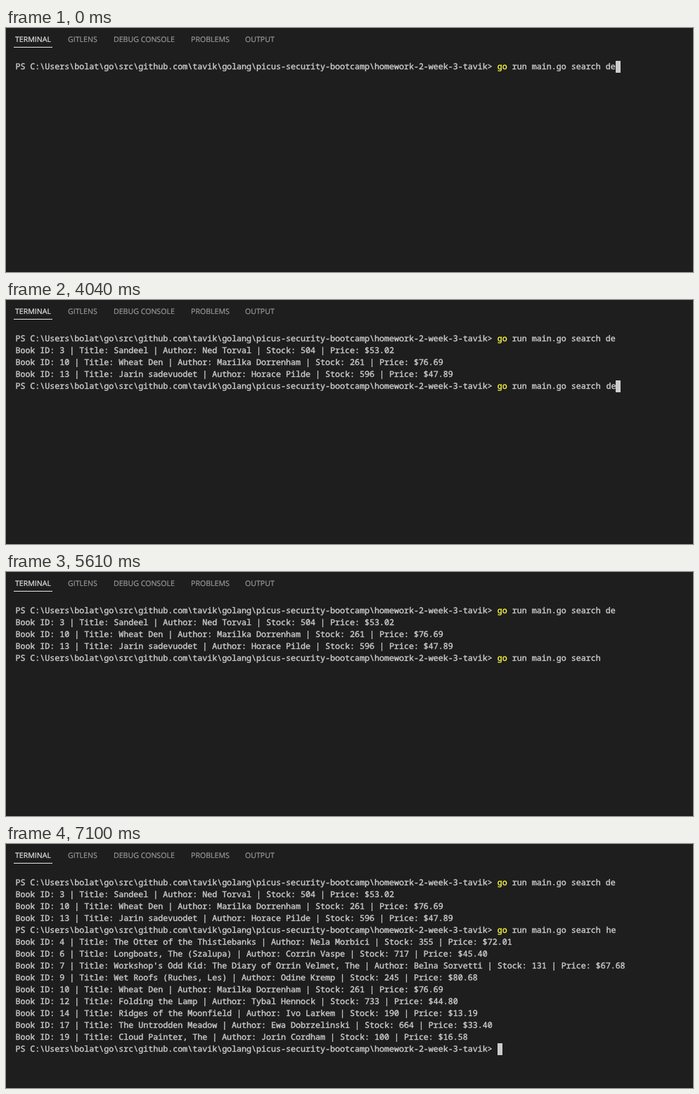
An HTML page for the animation above (7.83 s loop, 977 px wide and 349 px high).

```html
<!DOCTYPE html>
<html lang="en">
<head>
<meta charset="utf-8">
<title>Terminal search</title>
<style>
html, body { margin: 0; width: 100%; height: 100%; overflow: hidden; background: #1e1e1e; }

.tab {
  position: absolute; top: 9px;
  font: 10.6px/16px "Open Sans", "Noto Sans", sans-serif;
  color: #9a9a9a; white-space: nowrap; text-rendering: geometricPrecision;
  -webkit-text-stroke: .2px;
}
.tab.on { color: #e7e7e7; }
.line { position: absolute; left: 11px; top: 27px; width: 55px; height: 1px; background: #e7e7e7; }
.edge { position: absolute; left: 0; top: 348px; width: 977px; height: 1px; background: #191919; }

/* cell: 7 x 17 px */
.term {
  position: absolute; left: 13.4px; top: 47px; margin: 0;
  font: calc(7px / .6)/17px "Noto Sans Mono", "DejaVu Sans Mono", monospace;
  color: #ccc; white-space: pre; font-variant-ligatures: none; text-rendering: geometricPrecision;
  -webkit-text-stroke: .4px;
}
.term b { font-weight: 400; color: #f5f543; }
.key { position: absolute; left: 840px; top: 68px; }
.key.two { left: 847px; }
.cursor { position: absolute; left: 13px; top: 47px; width: 7px; height: 17px; background: #ccc; }

.first, .cmd, .d, .e, .h, .e2, .second, .cursor { animation: 7830ms step-end infinite; }
.first { animation-name: first; }
.cmd { animation-name: cmd; }
.d { animation-name: d; }
.e { animation-name: e; }
.h { animation-name: h; }
.e2 { animation-name: e2; }
.second { animation-name: second; }
.cursor { animation-name: cursor; }

@keyframes first { 0% { opacity: 0 } 14.559%, 100% { opacity: 1 } }
@keyframes cmd { 0% { opacity: 0 } 51.596%, 100% { opacity: 1 } }
@keyframes d { 0% { opacity: 0 } 51.596% { opacity: 1 } 63.218%, 100% { opacity: 0 } }
@keyframes e { 0% { opacity: 0 } 51.596% { opacity: 1 } 60.025%, 100% { opacity: 0 } }
@keyframes h { 0% { opacity: 0 } 72.669%, 100% { opacity: 1 } }
@keyframes e2 { 0% { opacity: 0 } 74.584%, 100% { opacity: 1 } }
@keyframes second { 0% { opacity: 0 } 90.676%, 100% { opacity: 1 } }
@keyframes cursor {
  0% { transform: translate(854px, 0); opacity: 1 }
  .893% { transform: translate(0, 17px); opacity: 1 }
  14.559% { transform: translate(686px, 68px); opacity: 1 }
  51.596% { transform: translate(854px, 68px); opacity: 1 }
  60.025% { transform: translate(847px, 68px); opacity: 1 }
  63.218% { transform: translate(840px, 68px); opacity: 1 }
  71.647% { transform: translate(840px, 68px); opacity: 0 }
  72.669% { transform: translate(847px, 68px); opacity: 1 }
  74.584% { transform: translate(854px, 68px); opacity: 1 }
  76.756% { transform: translate(0, 85px); opacity: 1 }
  90.676%, 100% { transform: translate(686px, 238px); opacity: 1 }
}
</style>
</head>
<body>
<div class="tab on" style="left:13px">TERMINAL</div>
<div class="tab" style="left:88px">GITLENS</div>
<div class="tab" style="left:153px">DEBUG CONSOLE</div>
<div class="tab" style="left:263px">PROBLEMS</div>
<div class="tab" style="left:340px">OUTPUT</div>
<div class="line"></div>
<div class="term">PS C:\Users\bolat\go\src\github.com\tavik\golang\picus-security-bootcamp\homework-2-week-3-tavik> <b>go</b> run main.go search de
<span class="first">Book ID: 3 | Title: Sandeel | Author: Ned Torval | Stock: 504 | Price: $53.02
Book ID: 10 | Title: Wheat Den | Author: Marilka Dorrenham | Stock: 261 | Price: $76.69
Book ID: 13 | Title: Jarin sadevuodet | Author: Horace Pilde | Stock: 596 | Price: $47.89
PS C:\Users\bolat\go\src\github.com\tavik\golang\picus-security-bootcamp\homework-2-week-3-tavik> </span><span class="cmd"><b>go</b> run main.go search </span>
<span class="second">Book ID: 4 | Title: The Otter of the Thistlebanks | Author: Nela Morbici | Stock: 355 | Price: $72.01
Book ID: 6 | Title: Longboats, The (Szalupa) | Author: Corrin Vaspe | Stock: 717 | Price: $45.40
Book ID: 7 | Title: Workshop's Odd Kid: The Diary of Orrin Velmet, The | Author: Belna Sorvetti | Stock: 131 | Price: $67.68
Book ID: 9 | Title: Wet Roofs (Ruches, Les) | Author: Odine Kremp | Stock: 245 | Price: $80.68
Book ID: 10 | Title: Wheat Den | Author: Marilka Dorrenham | Stock: 261 | Price: $76.69
Book ID: 12 | Title: Folding the Lamp | Author: Tybal Hennock | Stock: 733 | Price: $44.80
Book ID: 14 | Title: Ridges of the Moonfield | Author: Ivo Larkem | Stock: 190 | Price: $13.19
Book ID: 17 | Title: The Untrodden Meadow | Author: Ewa Dobrzelinski | Stock: 664 | Price: $33.40
Book ID: 19 | Title: Cloud Painter, The | Author: Jorin Cordham | Stock: 100 | Price: $16.58
PS C:\Users\bolat\go\src\github.com\tavik\golang\picus-security-bootcamp\homework-2-week-3-tavik> </span><span class="key d">d</span><span class="key two e">e</span><span class="key h">h</span><span class="key two e2">e</span></div>
<div class="cursor"></div>
<div class="edge"></div>
</body>
</html>
```
